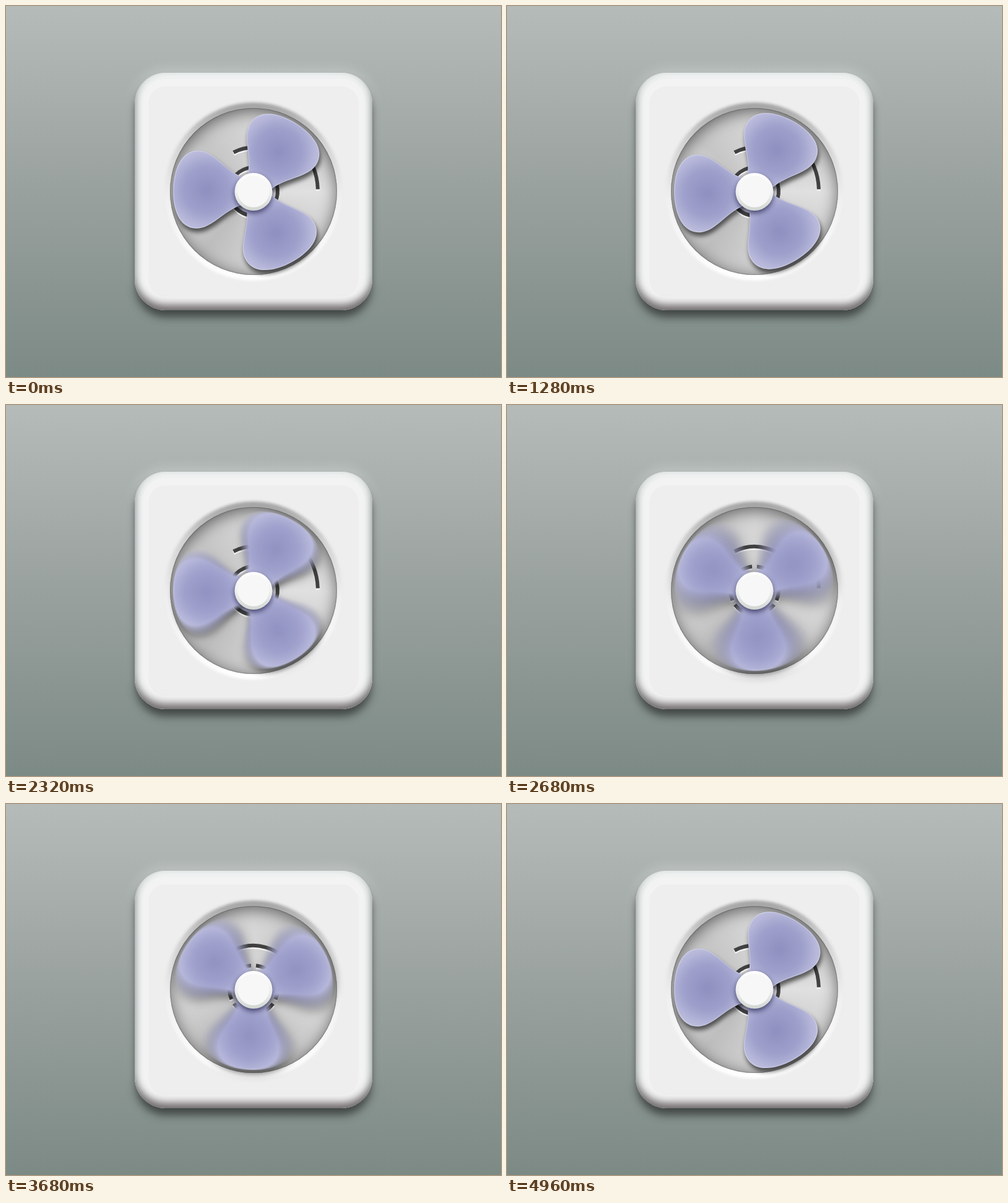
These frames come from a looping animation (800x600 px, 5.04 s). An HTML page with a canvas:

```html
<!DOCTYPE html>
<html>
<head>
<meta charset="utf-8">
<title>Fan</title>
<style>
html, body { margin: 0; width: 100%; height: 100%; overflow: hidden; }
body { background: linear-gradient(#b5bbb9, #99a19e 50%, #7c8a85); }
#stage { position: absolute; left: 0; top: 0; width: 800px; height: 600px; overflow: hidden; }
#stage > * { position: absolute; }
#body {
  left: 208px; top: 108px; width: 384px; height: 384px; border-radius: 50px; background: #eee;
  box-shadow:
    inset 0 -11px 13px -2px rgba(75, 66, 68, .75),
    inset 9px 0 12px -5px rgba(190, 208, 202, .55),
    inset -9px 0 12px -5px rgba(190, 208, 202, .55),
    inset 0 0 0 10px rgba(238, 241, 240, .6),
    inset 0 0 0 22px rgba(255, 255, 255, .25),
    0 12px 14px -1px rgba(52, 56, 54, .85),
    0 -6px 20px rgba(255, 255, 255, .25);
}
#rim {
  left: 257px; top: 156px; width: 286px; height: 288px; border-radius: 50%; filter: blur(2px);
  background: linear-gradient(#a2a2a2, #d2d2d2 22%, #f0f0f0 55%, #fff);
}
#dial {
  left: 265px; top: 165px; width: 270px; height: 270px; border-radius: 50%;
  background: conic-gradient(from 90deg, #e0e0e0, #c6c6c6 15%, #d0d0d0 25%, #bebebe 36%,
    #dadada 50%, #c6c6c6 62%, #d6d6d6 75%, #c8c8c8 88%, #e0e0e0);
  box-shadow: inset 0 5px 26px rgba(0, 0, 0, .55), inset 0 0 2px rgba(0, 0, 0, .6);
}
</style>
</head>
<body>
<div id="stage">
  <div id="body"></div>
  <div id="rim"></div>
  <div id="dial"></div>
  <canvas id="view" width="800" height="600"></canvas>
</div>
<script>
const W = 800, H = 600, CX = 400, CY = 300, LOOP = 5040, STEP = 40;
const DEG = Math.PI / 180;
const view = document.getElementById('view').getContext('2d');
const newLayer = () => {
  const canvas = document.createElement('canvas');
  canvas.width = W;
  canvas.height = H;
  return canvas.getContext('2d');
};
let layer = newLayer(), spare = newLayer();

const blade = new Path2D(
  'M-23-20C-34-48-63-66-63-91C-63-118-33-130 0-130C33-130 63-118 63-91C63-66 34-48 23-20Z');
const bladeFill = view.createRadialGradient(0, -76, 4, 0, -76, 70);
bladeFill.addColorStop(0, '#9091c0');
bladeFill.addColorStop(.5, '#9e9fcb');
bladeFill.addColorStop(1, '#c2c3e0');

// Anticlockwise turn: seconds, degrees
const turn = [[0, 0], [.56, 27], [1.28, 124], [1.92, 269], [2.68, 456], [3.04, 577],
  [3.68, 807], [4.48, 1015], [4.96, 1080]];

function slope(i) {
  if (i === 0 || i === turn.length - 1) return 0;
  const [a, b] = [turn[i - 1], turn[i + 1]];
  return (b[1] - a[1]) / (b[0] - a[0]);
}

function angleAt(s) {
  if (s >= 4.96) return 0;
  const i = turn.findIndex((p, k) => s < turn[k + 1][0]);
  const [t0, a0] = turn[i], [t1, a1] = turn[i + 1];
  const d = t1 - t0, u = (s - t0) / d, v = 1 - u;
  return v * v * (1 + 2 * u) * a0 + u * u * (3 - 2 * u) * a1 +
    d * u * v * (v * slope(i) - u * slope(i + 1));
}

const spinBlurAt = s => 40 * Math.max(0, 1 - Math.abs(s - 3.08) / 1.08);

function arc(r, from, to, dy) {
  view.beginPath();
  view.arc(CX, CY + dy, r, from * DEG, to * DEG);
  view.stroke();
}

function drawMarks() {
  view.lineWidth = 6;
  for (const [color, dy] of [['#f4f4f4', 2.5], ['#414141', 0]]) {
    view.strokeStyle = color;
    arc(71, -117, -32, dy);
    arc(104, -43, -2, dy);
    for (const gap of [-90, 30, 150]) arc(39, gap + 6, gap + 114, dy);
  }
}

function clear(c) {
  c.setTransform(1, 0, 0, 1, 0, 0);
  c.clearRect(0, 0, W, H);
}

function drawBlades(angle) {
  clear(layer);
  for (let k = 0; k < 3; k++) {
    layer.setTransform(1, 0, 0, 1, CX, CY);
    layer.rotate((32 + 120 * k - angle) * DEG);
    layer.globalAlpha = 1;
    layer.fillStyle = bladeFill;
    layer.fill(blade);
    layer.save();
    layer.clip(blade);
    layer.strokeStyle = 'rgba(255,255,255,.22)';
    layer.lineWidth = 3;
    layer.stroke(blade);
    layer.restore();
  }
}

// Each pass averages two turned copies, doubling the sample count
function spinBlur(amount) {
  for (let pass = 0, a = amount / 4; pass < 5; pass++, a /= 2) {
    clear(spare);
    spare.globalCompositeOperation = 'lighter';
    spare.globalAlpha = .5;
    for (const side of [-a, a]) {
      spare.setTransform(1, 0, 0, 1, CX, CY);
      spare.rotate(side * DEG);
      spare.drawImage(layer.canvas, -CX, -CY);
    }
    spare.globalCompositeOperation = 'source-over';
    [layer, spare] = [spare, layer];
  }
}

function setShadow(color, x, y, blur) {
  view.shadowColor = color;
  view.shadowOffsetX = x;
  view.shadowOffsetY = y;
  view.shadowBlur = blur;
}

function disc(r, y, fill) {
  view.fillStyle = fill;
  view.beginPath();
  view.arc(CX, y, r, 0, 2 * Math.PI);
  view.fill();
}

function drawHub() {
  const side = view.createLinearGradient(0, 270, 0, 331);
  side.addColorStop(0, '#fff');
  side.addColorStop(.5, '#f0f1f0');
  side.addColorStop(1, '#d2d6d2');
  setShadow('rgba(30,30,75,.75)', 0, 4, 8);
  disc(30.5, 300.5, side);
  setShadow('transparent', 0, 0, 0);
  disc(25.5, 300, '#f7f7f7');
}

function draw(ms) {
  const s = Math.floor((ms % LOOP) / STEP) * STEP / 1000;
  const blur = spinBlurAt(s);
  view.clearRect(0, 0, W, H);
  drawMarks();
  drawBlades(angleAt(s));
  if (blur > 0) spinBlur(blur);
  setShadow('rgba(0,0,0,.6)', 2, 6, 7 + blur * .3);
  view.drawImage(layer.canvas, 0, 0);
  drawHub();
}

let start;
function tick(now) {
  start ??= now;
  draw(Math.max(0, now - start));
  requestAnimationFrame(tick);
}
draw(0);
requestAnimationFrame(tick);
</script>
</body>
</html>
```
